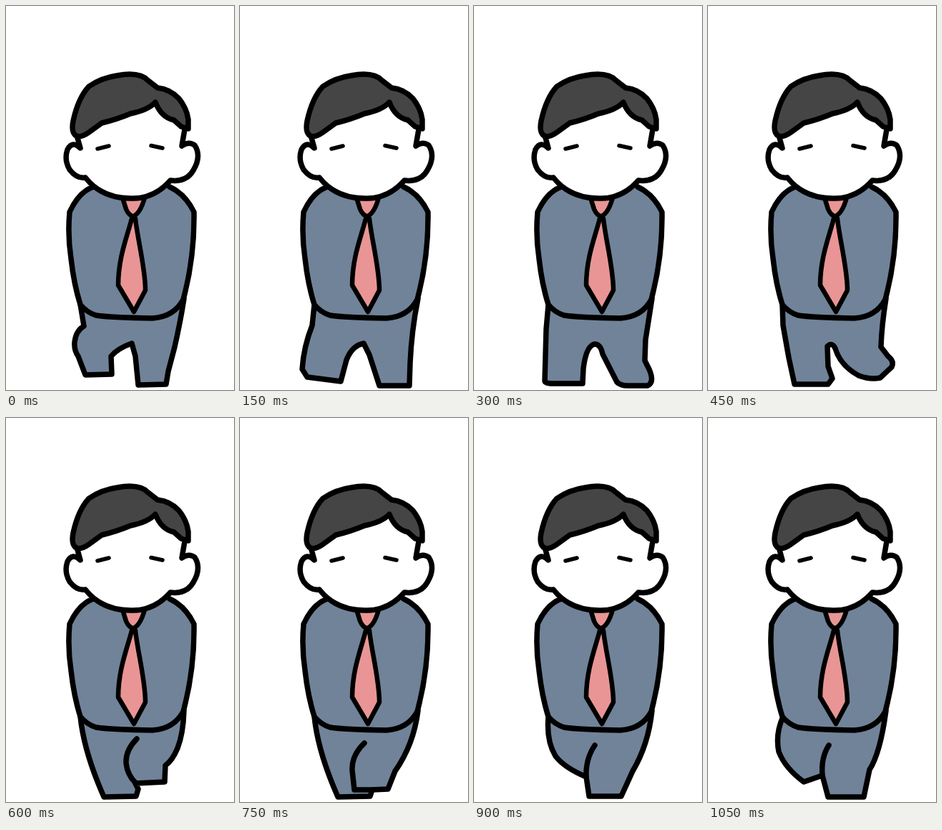
Animation of 319x535 px, one loop 1.2 s. Source, as an HTML page:

```html
<!DOCTYPE html>
<html lang="en">
<head>
<meta charset="utf-8">
<title>Walking office worker</title>
<style>
  html, body { margin: 0; width: 100%; height: 100%; overflow: hidden; background: #fff; }
  svg { display: block; width: 100%; height: 100%; }
  path { stroke: #000; stroke-width: 7.5; stroke-linecap: round; stroke-linejoin: round; fill: none; }
  .suit { fill: #718399; }
  .skin { fill: #fff; }
  .hair { fill: #454545; }
  .tie { fill: #e99595; stroke-width: 6.5; }
  .eye { stroke-width: 5.5; }
  .pose { visibility: hidden; animation: show 1200ms step-end infinite; animation-delay: calc(var(--i) * 150ms - 1200ms); }
  @keyframes show {
    0% { visibility: visible; }
    12.5%, 100% { visibility: hidden; }
  }
</style>
</head>
<body>
<svg viewBox="0 0 319 535">
  <!-- Legs: eight held poses of the walk -->
  <g class="pose" style="--i:0">
    <path class="suit" d="M104 416L109 446Q98 452 96 468Q95 480 101 488L111 514L148 513L147 488Q156 477 176 470L181 488L185 528L224 527L227 509L236 475Q244 440 249 408"/>
  </g>
  <g class="pose" style="--i:1">
    <path class="suit" d="M104 416L101 445Q89 475 87 506L94 517L141 523L149 493Q157 473 173 470L181 486L195 529L237 529L238 498Q240 452 249 408"/>
  </g>
  <g class="pose" style="--i:2">
    <path class="suit" d="M104 416L101 450L99 522Q99 526 110 526L152 526L153 505Q157 473 169 471Q177 471 180 485L200 524Q205 529 215 529L243 529Q253 524 245 506L239 494L240 465L249 408"/>
  </g>
  <g class="pose" style="--i:3">
    <path class="suit" d="M104 416L105 445L113 490L121 527L168 527L174 519L168 502L167 474Q174 468 178 477Q185 501 211 515Q227 521 241 518L257 503Q261 495 252 488L242 475Q243 445 249 408"/>
  </g>
  <g class="pose" style="--i:4">
    <path class="suit" d="M104 416Q109 465 137 528L182 527L185 517L181 509L222 507L223 484Q233 477 240 460Q248 440 249 408"/>
    <path d="M183 447Q167 463 168 481Q170 498 182 509"/>
  </g>
  <g class="pose" style="--i:5">
    <path class="suit" d="M104 416Q109 465 137 528L182 527L185 518L207 517L217 492Q243 455 249 408"/>
    <path d="M174 453Q156 470 157 491L160 518L185 518"/>
  </g>
  <g class="pose" style="--i:6">
    <path class="suit" d="M104 416Q101 450 114 471Q126 487 157 500L161 527L206 527L222 492Q244 455 249 408"/>
    <path d="M169 456Q156 475 157 500"/>
  </g>
  <g class="pose" style="--i:7">
    <path class="suit" d="M105 416Q94 440 99 465Q108 488 134 507L160 498L168 528L218 528L226 490Q241 467 249 408"/>
    <path d="M169 456Q158 473 160 498"/>
  </g>

  <!-- Torso -->
  <path class="suit" d="M122 252Q102 259 89 287Q86 320 91 352Q95 388 104 416Q113 427 126 431Q145 434 205 435Q235 433 248 409Q264 350 263 287Q251 262 229 252"/>

  <!-- Tie -->
  <path class="tie" d="M163 267L168 283Q172 292 178 293Q188 289 194 267"/>
  <path class="tie" d="M176 296C170 320 157 350 157 389L179 426L195 396C195 365 184 325 181 296Z"/>

  <!-- Head -->
  <path class="skin" d="M99 180L104 198Q93 187 86 200Q81 214 89 228Q99 241 111 239Q134 268 175 268Q207 269 230 243Q252 246 262 229Q274 209 264 194Q256 188 246 195L250 172"/>
  <path class="hair" d="M97 180Q91 175 94 160Q101 128 116 112Q134 100 155 97Q187 91 199 104L212 114Q230 116 242 129Q253 143 255 158L255 171L245 168L235 159Q217 155 209 134Q199 145 174 150Q155 158 134 163L116 176Q103 185 97 180Z"/>
  <path class="eye" d="M128 199L144 195M203 194.500L219 198"/>
</svg>
</body>
</html>
```
